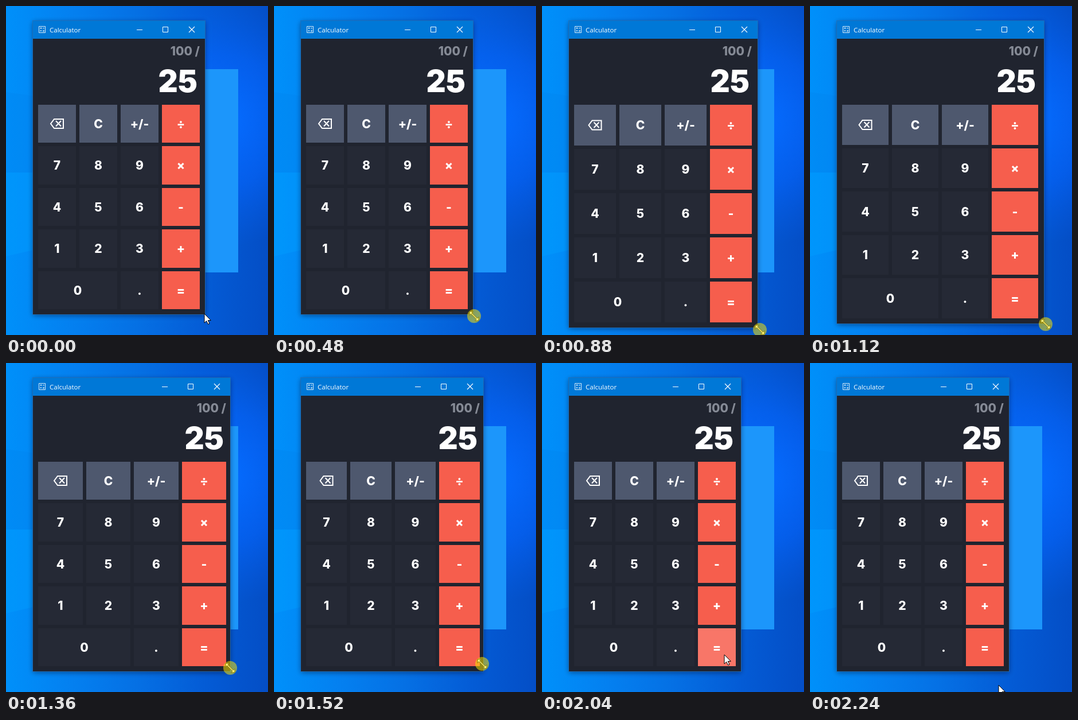
An HTML page with a canvas for the animation above (2.32 s loop, 457 px wide and 573 px high).

```html
<!DOCTYPE html>
<html lang="en">
<head>
<meta charset="utf-8">
<title>Resizable calculator</title>
<style>
html, body { margin: 0; width: 100%; height: 100%; overflow: hidden; background: #0560d8; }
canvas { display: block; }
</style>
</head>
<body>
<canvas id="stage" width="457" height="573"></canvas>
<script>
const ctx = document.getElementById('stage').getContext('2d');
const LOOP = 2320, TICK = 40, LAG = 20;
const LEFT = 47, TOP = 26, MIN_RIGHT = 348, MIN_BOTTOM = 538;
const GAP = 6, GRID_LEFT = LEFT + 9, GRID_TOP = 172;
const HOVER_EDGE = 80, PRESS = 480, RELEASE = 2040;

// Pointer route: time, x, y
const ROUTE = [
  [40, 346, 536], [200, 349, 540], [PRESS, 349, 540],
  [880, 380, 564], [1080, 409, 557], [1160, 412, 551],
  [1360, 391, 531], [1560, 356, 522], [1640, 353, 520],
  [1760, 318, 508], [RELEASE, 318, 508], [2240, 329, 561]
];

// A label repeated in its row makes one wide button
const ROWS = ['⌫ C +/- ÷', '7 8 9 ×', '4 5 6 -', '1 2 3 +', '0 0 . ='].map(r => r.split(' '));

function pointerAt(t) {
  const i = ROUTE.findIndex(key => key[0] > t);
  if (i < 0) return ROUTE[ROUTE.length - 1].slice(1);
  const b = ROUTE[i], a = ROUTE[i - 1] || b;
  const p = a === b ? 0 : (t - a[0]) / (b[0] - a[0]);
  return [1, 2].map(n => a[n] + (b[n] - a[n]) * p);
}

// The window corner trails the pointer until the button is released
function cornerAt(t) {
  const [x, y] = pointerAt(Math.min(t, RELEASE));
  return [Math.max(MIN_RIGHT, Math.round(x - 1)), Math.max(MIN_BOTTOM, Math.round(y - 2))];
}

function rect(x, y, w, h, color) {
  ctx.fillStyle = color;
  ctx.fillRect(x, y, w, h);
}

function text(str, x, y, font, color, align) {
  ctx.font = font;
  ctx.fillStyle = color;
  ctx.textAlign = align;
  ctx.fillText(str, x, y);
}

function path(d, x, y, stroke, width, fill) {
  const p = new Path2D(d);
  ctx.save();
  ctx.translate(x, y);
  if (fill) {
    ctx.fillStyle = fill;
    ctx.fill(p);
  }
  if (stroke) {
    ctx.strokeStyle = stroke;
    ctx.lineWidth = width;
    ctx.stroke(p);
  }
  ctx.restore();
}

function wash(gradient, ...colors) {
  colors.forEach((color, i) => gradient.addColorStop(i / (colors.length - 1), color));
  rect(0, 0, 457, 573, gradient);
}

function drawDesktop() {
  wash(ctx.createLinearGradient(0, 0, 457, 0), '#0090fa', '#0480f0', '#0570e4', '#045cd6', '#044ec6');
  wash(ctx.createRadialGradient(375, 200, 10, 375, 200, 220),
    'rgba(5,108,255,1)', 'rgba(5,102,255,.6)', 'rgba(5,96,240,0)');
  path('M0 150L60 158V290H0Z', 0, 0, null, 0, 'rgba(0,130,235,.3)');
  path('M0 290H60V422L0 436Z', 0, 0, null, 0, 'rgba(0,160,255,.35)');
  rect(51, 110, 354, 354, '#1c96fb');
}

function drawFrame(right, bottom) {
  const w = right - LEFT - 1, h = bottom - TOP - 1;
  ctx.save();
  ctx.shadowColor = 'rgba(0,10,40,.5)';
  ctx.shadowBlur = 9;
  ctx.shadowOffsetY = 2;
  rect(LEFT, TOP, w, h, '#20242f');
  ctx.restore();
  rect(LEFT, TOP, w, 31, '#0078d7');
  ctx.strokeStyle = 'rgba(40,110,175,.75)';
  ctx.lineWidth = 1;
  ctx.strokeRect(LEFT - 0.5, TOP - 0.5, w + 1, h + 1);

  path('M.5 .5H11.5V11.5H.5ZM2.5 3.5H5.5M4 2V5M7 3.5H10M2.5 7L5 9.5M5 7L2.5 9.5M7 7.5H10M7 9.5H10',
    57, 35, 'rgba(255,255,255,.85)', 1);
  text('Calculator', 76, 46, '11.5px "Open Sans", sans-serif', '#fff', 'left');
  path('M0 .5H10', right - 120, 41, '#fff', 1);
  path('M.5 .5H9.5V9.5H.5Z', right - 75, 36, '#fff', 1);
  path('M0 0L10 10M10 0L0 10', right - 29, 36, '#fff', 1.1);
}

function drawButton(label, x, y, w, h, color) {
  rect(x, y, w, h, color);
  const cx = x + w / 2, cy = y + h / 2;
  if (label === '⌫') {
    path('M-5 -8H11V8H-5L-11 0ZM-2 -5L7 4.5M7 -5L-2 4.5', cx, cy, '#fff', 2);
  } else {
    text(label, cx, cy + 7.5, '800 21px Inter, sans-serif', '#fff', 'center');
  }
}

function drawContent(right, bottom, hover) {
  text('100 /', right - 10, 86, '800 21px Inter, sans-serif', '#858a95', 'right');
  text('25', right - 14, 150, '900 53px Inter, sans-serif', '#fff', 'right');

  const stepX = (right - 10 - GRID_LEFT + GAP) / 4;
  const stepY = (bottom - 10 - GRID_TOP + GAP) / 5;
  ROWS.forEach((labels, row) => labels.forEach((label, col) => {
    if (label === labels[col - 1]) return;
    const span = label === labels[col + 1] ? 2 : 1;
    const x = Math.round(GRID_LEFT + col * stepX);
    const y = Math.round(GRID_TOP + row * stepY);
    const w = Math.round(GRID_LEFT + (col + span) * stepX - GAP) - x;
    const h = Math.round(GRID_TOP + (row + 1) * stepY - GAP) - y;
    const hot = hover && hover[0] > x && hover[0] < x + w && hover[1] > y && hover[1] < y + h;
    const color = col === 3 ? (hot ? '#f87668' : '#f65e4d') : row === 0 ? '#4e586e' : '#252935';
    drawButton(label, x, y, w, h, color);
  }));
}

function drawPointer(t, x, y) {
  if (t < HOVER_EDGE || t >= RELEASE) {
    path('M0 0V16L3.7 12.5L6.5 18.2L9 17.1L6.3 11.5H11.3Z', x, y, '#000', 1, '#fff');
    return;
  }
  path('M-8 -8H-1.5L-4 -5.5L5.5 4L8 1.5V8H1.5L4 5.5L-5.5 -4L-8 -1.5Z', x, y, '#000', 1, '#fff');
  if (t >= PRESS) {
    ctx.fillStyle = 'rgba(255,232,0,.52)';
    ctx.beginPath();
    ctx.arc(x, y, 12, 0, 2 * Math.PI);
    ctx.fill();
  }
}

function draw(now) {
  const t = Math.floor(now % LOOP / TICK) * TICK;
  const pointer = pointerAt(t).map(Math.round);
  const corner = cornerAt(t - LAG);
  const [contentRight] = cornerAt(t - 2 * LAG);
  drawDesktop();
  drawFrame(...corner);
  drawContent(contentRight, corner[1], t >= RELEASE && pointer);
  drawPointer(t, ...pointer);
}

const start = performance.now();
function loop() {
  draw(performance.now() - start);
  requestAnimationFrame(loop);
}
loop();
</script>
</body>
</html>
```
